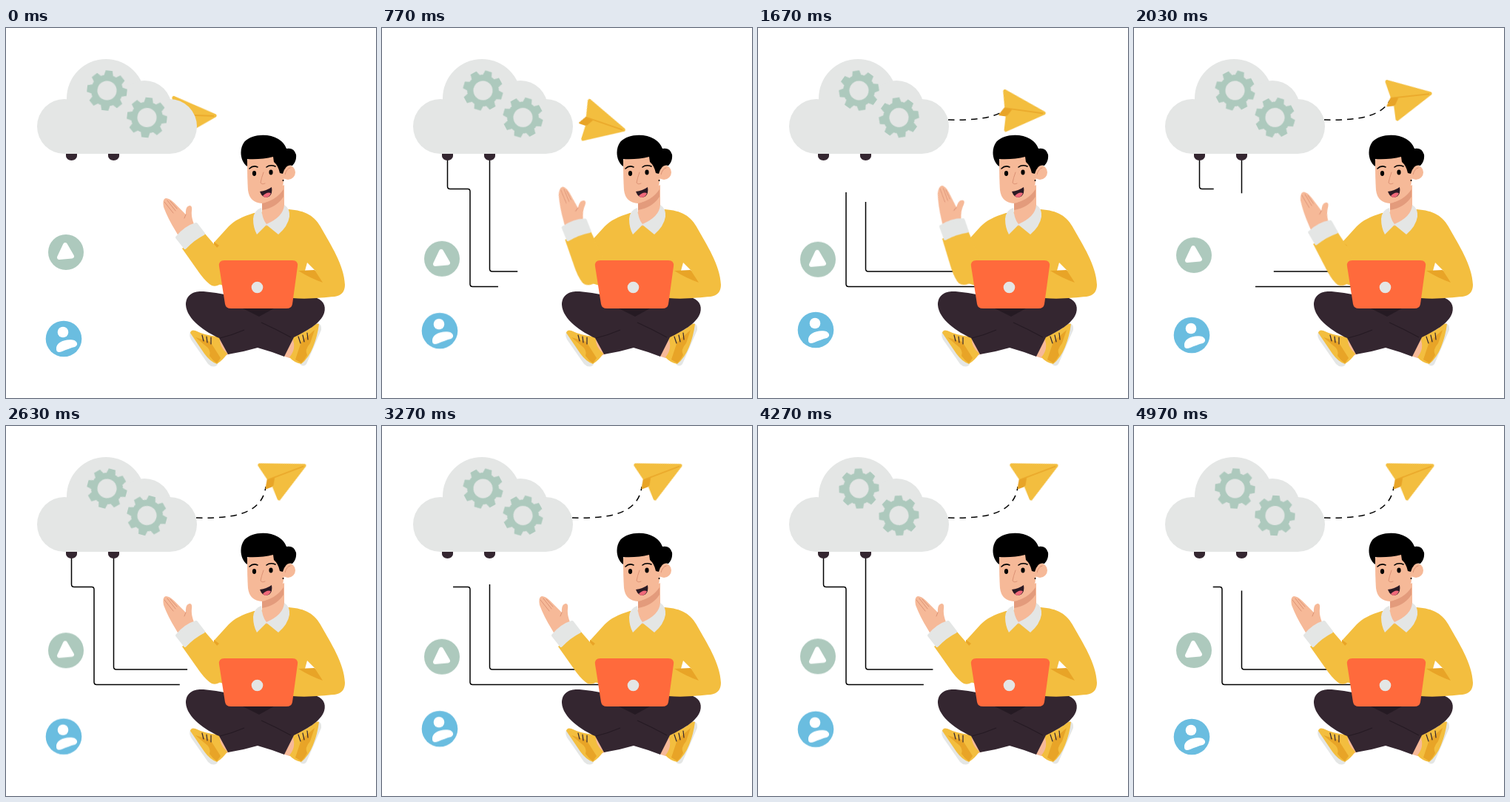
Write an HTML page that moves like this. It is 500 px wide and 500 px high and loops after 5010 ms.

```html
<!DOCTYPE html>
<html lang="en">
<head>
<meta charset="utf-8">
<title>Cloud service</title>
<style>
  html, body { margin: 0; width: 100%; height: 100%; overflow: hidden; background: #fff; }
  svg { display: block; width: 100vw; height: 100vh; }

  :root {
    --loop: 5010ms;
    --smooth: cubic-bezier(.333, 0, .667, 1);
    --sine: cubic-bezier(.37, 0, .63, 1);
  }
  .grey { fill: #e4e6e5; }
  .green { fill: #adc9bd; }
  .yellow { fill: #f3be3f; }
  .amber { fill: #e8a427; }
  .dark { fill: #342630; }
  .skin { fill: #f6b998; }
  .white { fill: #fff; }
  .line { fill: none; stroke: #000; stroke-width: 1.5; }
  .crease { fill: none; stroke: #dc9275; stroke-width: 1; stroke-linecap: round; }
  .lace { fill: none; stroke: #342630; stroke-width: 1.2; stroke-linecap: round; }
  .round { stroke-linejoin: round; }

  .gear { animation: spin var(--loop) linear infinite; }
  @keyframes spin { from { transform: rotate(6deg); } to { transform: rotate(366deg); } }

  .bob { animation: bob calc(var(--loop) / 4) var(--sine) infinite alternate; }
  @keyframes bob { to { transform: translateY(var(--rise)); } }

  /* dash list: nothing, hidden start, visible part, hidden rest */
  .wire { stroke-dasharray: 0 0 0 2; animation: wire var(--loop) var(--smooth) infinite; }
  .second { animation-delay: calc(var(--loop) / 3); }
  .third { animation-delay: calc(var(--loop) * 2 / 3); }
  @keyframes wire {
    0%, 1.2% { stroke-dasharray: 0 0 0 2; }
    25.3%, 27% { stroke-dasharray: 0 0 1 2; }
    49.5%, 100% { stroke-dasharray: 0 1 0 2; }
  }
  /* the last run is cut off when the loop restarts */
  .late { animation: late var(--loop) step-end infinite; }
  @keyframes late { 0% { opacity: 0; } 50% { opacity: 1; } }

  .arm { transform-origin: 285px 325px; animation: wave var(--loop) var(--sine) infinite; }
  @keyframes wave {
    0%, 50.2%, 100% { transform: rotate(0deg); }
    25.3% { transform: rotate(24deg); }
  }

  .plane { animation: fly var(--loop) linear infinite; }
  @keyframes fly {
    0% { transform: translate(285px, 119px) rotate(2deg); }
    11.2% { transform: translate(312px, 133px) rotate(14deg); }
    15.4% { transform: translate(329px, 139px) rotate(19deg); }
    22% { transform: translate(341px, 143px) rotate(24deg); }
    25.3% { transform: translate(355px, 143px) rotate(25deg); }
    32.8% { transform: translate(388px, 118px) rotate(9deg); }
    41% { transform: translate(404px, 87px) rotate(-7deg); }
    46% { transform: translate(405.5px, 65px) rotate(-16deg); }
    51%, 100% { transform: translate(406px, 53px) rotate(-20.7deg); }
  }

  .reveal { stroke-dasharray: 1 2; animation: reveal var(--loop) linear infinite; }
  @keyframes reveal {
    0%, 15.4% { stroke-dashoffset: 1; }
    25.3% { stroke-dashoffset: .64; }
    41% { stroke-dashoffset: .13; }
    51%, 100% { stroke-dashoffset: 0; }
  }
</style>
</head>
<body>
<svg viewBox="0 0 500 500">
  <defs>
    <path id="tooth" d="M-6 -21 L-4.6 -27 H4.6 L6 -21 V21 L4.6 27 H-4.6 L-6 21Z"/>
    <g id="gear">
      <circle r="21.5"/>
      <use href="#tooth"/>
      <use href="#tooth" transform="rotate(45)"/>
      <use href="#tooth" transform="rotate(90)"/>
      <use href="#tooth" transform="rotate(135)"/>
      <circle r="13" class="grey"/>
    </g>
    <g id="wires">
      <path pathLength="1" d="M88.5 177 V214 Q88.5 217.500 92 217.500 H116 Q119 217.500 119 221 V346 Q119 349.500 122.500 349.500 H295"/>
      <path pathLength="1" d="M145.500 177 V325.500 Q145.500 329 149 329 H293"/>
    </g>
    <path id="route" d="M257 124 C300 125 346 122 351 82"/>
    <mask id="shown" maskUnits="userSpaceOnUse" x="240" y="60" width="140" height="80">
      <path class="reveal" pathLength="1" d="M257 124 C300 125 346 122 351 82" fill="none" stroke="#fff" stroke-width="6"/>
    </mask>
  </defs>

  <!-- paper plane -->
  <g mask="url(#shown)"><use href="#route" class="line" stroke-dasharray="8.500 7"/></g>
  <g class="plane round">
    <path class="amber" stroke="#e8a427" stroke-width="2" d="M-56 0 L-62 10 L-51 10Z"/>
    <path class="yellow" stroke="#f3be3f" stroke-width="5" d="M-59 -22.500 L-3 -.5 L-50.500 29 L-51 9 L-54 -1Z"/>
    <path d="M-56 0 H-4" fill="none" stroke="#e8a427" stroke-width="1.300"/>
    <path class="amber" d="M-57 0 L-46 .4 L-51.500 10 L-58 10Z"/>
  </g>

  <!-- wires and cloud -->
  <g class="line">
    <use href="#wires" class="wire"/>
    <use href="#wires" class="wire second"/>
    <g class="late"><use href="#wires" class="wire third"/></g>
  </g>
  <path class="dark" d="M81 170 H96 V173 A7.500 6 0 0 1 81 173Z M138 170 H153 V173 A7.500 6 0 0 1 138 173Z"/>
  <g class="grey">
    <circle cx="79" cy="133" r="37"/>
    <circle cx="135" cy="95" r="53"/>
    <circle cx="187" cy="108" r="37"/>
    <circle cx="221" cy="133" r="37"/>
    <path d="M79 100 H221 V170 H79Z"/>
  </g>
  <g class="green">
    <g transform="translate(136.500 84.500)"><use href="#gear" class="gear"/></g>
    <g transform="translate(190.500 121)"><use href="#gear" class="gear"/></g>
  </g>

  <!-- floating badges -->
  <g class="bob" style="--rise: 13px">
    <circle class="green" cx="81" cy="303" r="24"/>
    <path class="white round" stroke="#fff" stroke-width="6" d="M80 293 L89 308.500 L72 310Z"/>
  </g>
  <g class="bob" style="--rise: -16px">
    <circle cx="78" cy="420" r="24.300" fill="#6abde0"/>
    <circle class="white" cx="77" cy="411" r="7.300"/>
    <path class="white" d="M68 434 C67 425 79 420 90 421.500 C97 422.500 98 429 93 431 C88 432 81 435 76 437 C71 439 68 438 68 434Z"/>
  </g>

  <!-- legs and shoes -->
  <path class="skin" d="M285 420 L294 414 L303 440 L296 443Z M390 414 L394 442 L383 446 L374 443Z"/>
  <path class="grey" d="M249 411 Q247 415 250 421 L273 454 Q279 460 285 456 L288 449 L255 410Z"/>
  <path class="yellow" d="M249 412 Q250 407 256 409 Q268 415 285 417 L289 419 Q288 431 299 440 Q294 448 285 454 Q276 451 268 440Z"/>
  <path class="amber" d="M256 418 L276 424 L290 446 L285 453 Q279 449 275 443 Q278 435 268 428Z"/>
  <path class="lace" d="M265 415 L267 423 M271 417 L272 425 M277 418 L277 427"/>
  <path class="grey" d="M421 399 Q427 400 426 408 L406 454 Q402 459 397 454 L396 447Z"/>
  <path class="yellow" d="M423 400 Q420 398 415 403 Q405 411 391 415 L387 419 Q393 433 383 445 Q389 452 399 454 Q409 446 415 431 Q421 416 423 400Z"/>
  <path class="amber" d="M417 408 L399 424 L391 448 L399 453 Q404 448 407 442 Q403 435 411 426Z"/>
  <path class="lace" d="M407 412 L408 421 M401 415 L403 424 M395 417 L398 426"/>
  <path class="dark" d="M243 374 C243 360 254 355 267 356 C290 358 310 363 340 371 C370 366 395 363 416 364 C428 366 433 375 430 385 C425 400 405 410 389 418 L376 444 Q358 437 340 432 Q320 438 300 441 L288 419 C270 411 244 394 243 374Z"/>
  <path d="M320 379 H362 L342 390Z" fill="#251a23"/>
  <path d="M345 398 Q365 407 385 418 M289 419 Q306 415 322 408" fill="none" stroke="#251a23" stroke-width="1.200"/>

  <!-- body -->
  <path class="yellow" d="M335 250 C319 255 309 260 301 268 L281 290 L285 300 L284 345 L300 350 H384 L387 365 C410 367 429 364 444 363 Q458 361 458 347 C457 320 438 292 427 272 C417 253 405 247 382 245Z"/>
  <path class="white" d="M407 317 L418 328 L404 328Z"/>
  <path class="amber" d="M417 327 L428 344 Q411 338 395 328Z M387 363 L383 378 L388 364Z"/>
  <path class="skin" d="M346 230 L376 212 V245 Q372 258 352 268 Q344 258 346 246Z"/>
  <path d="M346 236 Q364 234 375 218 V228 Q365 243 346 246Z" fill="#e39b7c"/>
  <path class="grey" d="M345 243 Q335 246 334 258 Q334 270 339 279 L352 266 L368 279 Q381 268 383 255 Q384 244 376 239 Q375 255 352 265 Q346 258 345 243Z"/>

  <!-- head -->
  <circle class="skin" cx="381" cy="195" r="10"/>
  <path class="crease" d="M377 198 Q379 190 384 189"/>
  <path class="skin" d="M326 180 Q326 205 327 219 Q329 236 346 237 Q363 234 374 214 L378 190 L366 172 L328 172Z"/>
  <path d="M326 187 C316 180 315 163 322 154 C332 143 355 142 368 150 Q376 155 379 163 Q389 161 392 171 Q393 180 387 186 Q378 183 374 197 L370 196 Q368 186 362 181 L361 174 Q345 178 326 177Z"/>
  <circle cx="374.500" cy="206" r="1"/>
  <ellipse cx="335.500" cy="196.500" rx="2.600" ry="3.400"/>
  <ellipse cx="358" cy="195" rx="2.600" ry="3.400"/>
  <path d="M329 190 Q334 185 340 188 M352 188 Q357 184 364 187" fill="none" stroke="#000" stroke-width="1.600" stroke-linecap="round"/>
  <path class="crease" d="M348 195 Q345 203 344 209 Q346 212 350 210"/>
  <path d="M343 221 Q352 220 359 215 Q361 227 352 229 Q346 229 343 221Z" fill="#2b1a24"/>
  <path d="M347 227 Q352 221 358 223 Q356 229 350 229Z" fill="#f0697a"/>

  <!-- waving forearm -->
  <path class="amber" d="M281 289 L288 294 L281 301Z"/>
  <g class="arm">
    <path class="skin" d="M213 242 Q211 231 216 230 Q221 230 227 236 L243 252 Q242 241 248 240 Q252 240 251 247 Q250 255 254 265 L258 272 L236 286 L229 274 Q219 258 213 242Z"/>
    <path class="crease" d="M214 235 L226 250 M218 233 L229 247 M222 234 L231 244 M243 252 L241 257"/>
    <path class="yellow" d="M238 298 L268 277 L294 307 L294 342 Q286 351 278 348 Q271 344 262 332Z"/>
    <path class="grey round" stroke="#e4e6e5" stroke-width="4" d="M231 283 Q243 269 257 265 L267 278 Q253 285 242 297Z"/>
  </g>

  <!-- laptop -->
  <path d="M295 314 H387 Q395 314 394 322 L387 373 Q386 379 379 379 H304 Q297 379 296 373 L288 322 Q287 314 295 314Z" fill="#ff6a3c"/>
  <circle class="grey" cx="339.500" cy="350.500" r="7.800"/>
</svg>
</body>
</html>
```
